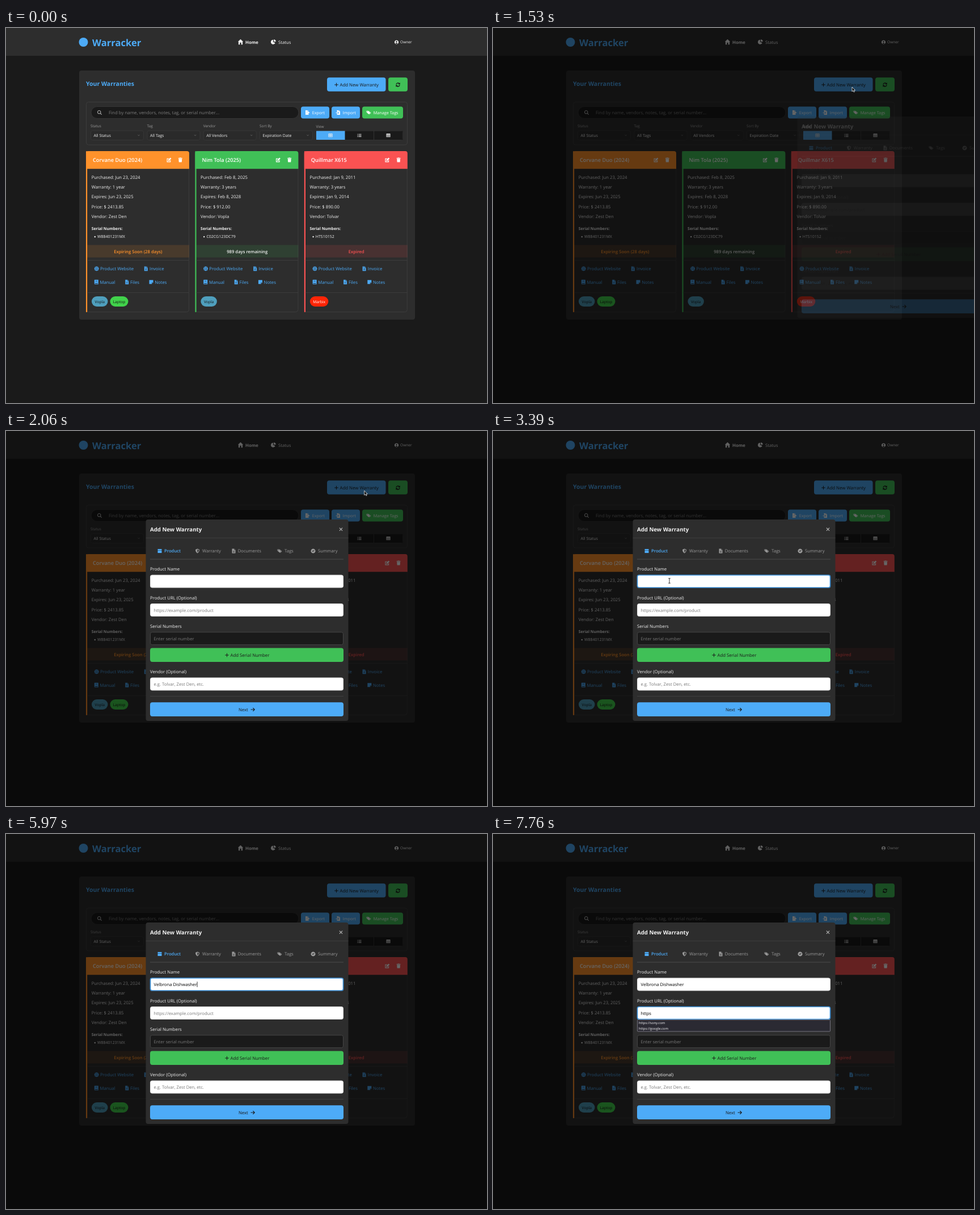
Recreate the animation shown at these times as an HTML page. Size 848 by 661 pixels, loop 8000 ms.

```html
<!DOCTYPE html>
<html lang="en">
<head>
<meta charset="utf-8">
<title>Warranty dashboard</title>
<style>
html, body { margin: 0; width: 100%; height: 100%; overflow: hidden; background: #1a1a1a; }
svg { display: block; width: 100%; height: 100%; }
text { font-family: "Open Sans", "Noto Sans", sans-serif; white-space: pre; text-rendering: geometricPrecision; }
</style>
</head>
<body>
<svg id="stage" viewBox="0 0 848 661"></svg>
<script>
const BLUE = '#4dabf7', GREEN = '#40c057', ORANGE = '#ff922b', RED = '#fa5252';
const PANEL = '#2d2d2d', DARK = '#1a1a1a', LINE = '#3c3c3c', LIGHT = '#f1f1f1', GRAY = '#999';
const LOOP = 8000, FRAME = 200 / 3;

// Icon outlines on a 16 x 16 grid, filled with the even-odd rule
const DISC = 'M8 0a8 8 0 1 0 .01 0z';
const SHEET = 'M2 0H9V5H14V16H2zM10 0L14 4H10zM5 8H11V9.3H5zM5 11H11V12.3H5z';
const ICONS = {
  home: 'M8 0L16 7.5H14V16H10V10H6V16H2V7.5H0z',
  pie: 'M7 1A7.5 7.5 0 1 0 14 11L7 8.5zM9 0V7H16A7 7 0 0 0 9 0z',
  user: DISC + 'M8 3a2.8 2.8 0 1 1-.01 0zM3.5 12.5q4.5-5 9 0q-4.5 4-9 0z',
  plus: 'M7 1H9V7H15V9H9V15H7V9H1V7H7z',
  sync: 'M1 7A7 7 0 0 1 13 3L15 1V7H9L11 5A4.5 4.5 0 0 0 3.5 7zM15 9A7 7 0 0 1 3 13L1 15V9H7L5 11A4.5 4.5 0 0 0 12.5 9z',
  search: 'M6.5 0a6.5 6.5 0 1 0 .01 0zM6.5 2a4.5 4.5 0 1 1-.01 0zM10.5 12L12 10.5L16 14.5L14.5 16z',
  export: 'M1 0H8V5H11V7H6V10H12V16H1zM9 0L12 4H9zM11 4.5L16 8.5L11 12.5V10H7V7H11z',
  import: 'M4 0H10V4H15V16H4V11H8V13L12 9L8 5V7H4zM11 0L15 3H11zM0 8H8V10H0z',
  tags: 'M0 2H6L13 9L8 14L0 7zM3 3.5a1.2 1.2 0 1 0 .01 0zM8 2L16 9L10.5 14.5L9.5 13.5L14 9L7.5 2.5z',
  grid: 'M0 1H16V15H0zM2 4H7V7.5H2zM9 4H14V7.5H9zM2 9.5H7V13H2zM9 9.5H14V13H9z',
  list: 'M0 2H3V4H0zM5 2H16V4H5zM0 7H3V9H0zM5 7H16V9H5zM0 12H3V14H0zM5 12H16V14H5z',
  table: 'M0 1H16V15H0zM2 5H5V8H2zM6.5 5H9.5V8H6.5zM11 5H14V8H11zM2 10H5V13H2zM6.5 10H9.5V13H6.5zM11 10H14V13H11z',
  chevron: 'M2 5L3 4L8 9L13 4L14 5L8 11z',
  edit: 'M1 3H8V5H3V13H11V9H13V15H1zM5 11V8L12 1L15 4L8 11z',
  trash: 'M5 0H11V1H15V3H1V1H5zM2 4H14L13 16H3z',
  globe: DISC + 'M1 5H15V6H1zM1 10H15V11H1zM5 1H6V15H5zM10 1H11V15H10z',
  file: SHEET,
  invoice: SHEET + 'M4 2H7V3.5H4z',
  book: 'M2 0H15V16H3Q1 16 1 13V2Q1 0 2 0zM3 12H13V14H3zM5 4H11V5.5H5z',
  note: 'M1 1H15V10L10 15H1zM10 10H14L10 14z',
  box: 'M1 1H15V5H1zM1 6H15V15H1z',
  shield: 'M8 0L15 3Q15 12 8 16Q1 12 1 3zM8 2.5V13.5Q13 10 13 4.5z',
  check: DISC + 'M4 8L5.5 6.5L7.2 8.2L11 4.5L12.3 6L7.2 11z',
  arrow: 'M9 2L15 8L9 14L7.5 12.5L11 9H1V7H11L7.5 3.5z',
  close: 'M2 3.5L3.5 2L8 6.5L12.5 2L14 3.5L9.5 8L14 12.5L12.5 14L8 9.5L3.5 14L2 12.5L6.5 8z'
};

// y is the middle of the capitals
const text = (s, x, y, size, color = LIGHT, weight = 400, extra = '') =>
  `<text x="${x}" y="${y + size * 0.36}" font-size="${size}" fill="${color}" font-weight="${weight}" ${extra}>${s}</text>`;
const centered = (s, x, y, size, color, weight) => text(s, x, y, size, color, weight, 'text-anchor="middle"');
const rect = (x, y, w, h, fill, r = 0, extra = '') =>
  `<rect x="${x}" y="${y}" width="${w}" height="${h}" rx="${r}" fill="${fill}" ${extra}/>`;
const framed = (x, y, w, h, fill, r, stroke = LINE, extra = '') =>
  rect(x + .5, y + .5, w - 1, h - 1, fill, r, `stroke="${stroke}" ${extra}`);
const icon = (name, x, y, size, color) =>
  `<path transform="translate(${x - size / 2} ${y - size / 2}) scale(${size / 16})" fill="${color}" fill-rule="evenodd" d="${ICONS[name]}"/>`;
const rule = (x, y, w, color = LINE) => rect(x, y, w, 1, color);

function header() {
  return rect(0, 0, 848, 49, PANEL) +
    `<circle cx="136.5" cy="25" r="8" fill="${BLUE}"/>` +
    text('Warracker', 152, 26, 16.6, BLUE, 700) +
    icon('home', 413.5, 24.5, 9.5, LIGHT) + text('Home', 422, 25, 7.7, LIGHT, 700) +
    icon('pie', 471.5, 24.5, 8.5, LIGHT) + text('Status', 480, 25, 7.7) +
    icon('user', 688.5, 25, 7.2, LIGHT) + text('Owner', 695, 25, 6.6);
}

function toolbar() {
  const button = (x, w, name, label, color) =>
    rect(x, 138.5, w, 21, color, 4) + icon(name, x + 11.5, 149, 8, '#fff') + text(label, x + 19.7, 149, 7.25, '#fff');
  const select = (x, label, value) =>
    text(label, x, 172.5, 6.5, GRAY) + framed(x, 180.5, 94, 17.5, '#2a2a2a', 3, '#363636') +
    text(value, x + 5.5, 189.3, 7.1) + icon('chevron', x + 85, 189.3, 5, '#777');
  const view = (x, name, color) => rect(x, 181.5, 50.5, 15.5, color) + icon(name, x + 25, 189.3, 7, '#eee');
  return framed(141, 130, 567, 76.5, PANEL, 4) +
    framed(149.5, 138, 367, 22, DARK, 11, '#353535') + icon('search', 165, 149, 8, '#bbb') +
    text('Find by name, vendors, notes, tag, or serial number...', 181, 149.3, 7.9, '#7c7c7c') +
    button(520, 50, 'export', 'Export', BLUE) + button(574, 50, 'import', 'Import', BLUE) +
    button(628, 72, 'tags', 'Manage Tags', GREEN) +
    select(149, 'Status', 'All Status') + select(248.5, 'Tag', 'All Tags') +
    select(347.7, 'Vendor', 'All Vendors') + select(447, 'Sort By', 'Expiration Date') +
    text('View', 546.5, 173.5, 6.5, GRAY) +
    framed(546.5, 181, 153.5, 16.5, DARK, 3) + view(547, 'grid', BLUE) + view(598, 'list', DARK) + view(649, 'table', DARK) +
    rect(648, 182, 1, 15, '#333');
}

function card(x, c) {
  const link = (name, label, dx, y, gap = 6.2) => icon(name, x + dx, y, 8, BLUE) + text(label, x + dx + gap, y + .3, 7.75, BLUE);
  let pillX = x + 10;
  const pill = ([label, width, fill, color]) => {
    const out = rect(pillX, 473, width, 18, fill, 9) + centered(label, pillX + width / 2, 482.3, 6.7, color);
    pillX += width + 4;
    return out;
  };
  const rows = ['Purchased: ' + c.bought, 'Warranty: ' + c.length, 'Expires: ' + c.ends, 'Price: $ ' + c.price, 'Vendor: ' + c.vendor];
  return framed(x, 217, 182, 284, PANEL, 4) + rect(x, 217, 2.2, 284, c.color, 1) +
    `<path d="M${x} 248.3V221q0-4 4-4h174q4 0 4 4v27.3z" fill="${c.color}"/>` +
    text(c.title, x + 12, 233, 9.25, '#fff', 600) +
    icon('edit', x + 146.5, 232.5, 9, '#fff') + icon('trash', x + 166.3, 232.5, 8, '#fff') +
    rows.map((row, i) => text(row, x + 9.7, 263.2 + i * 17.2, 7.73)).join('') +
    text('Serial Numbers:', x + 9.7, 353.3, 6.9, LIGHT, 700) +
    `<circle cx="${x + 15.8}" cy="368" r="1.2" fill="${LIGHT}"/>` + text(c.serial, x + 20, 367.7, 7) +
    rect(x + 2, 382.5, 180, 22, c.color, 0, 'opacity=".13"') +
    centered(c.state, x + 91.8, 394.2, 7.7, c.stateColor, 600) +
    rule(x + 2, 409, 180) + rule(x + 2, 466, 180) +
    link('globe', 'Product Website', 18.7, 424.3) + link('invoice', 'Invoice', 105.8, 424.3) +
    link('book', 'Manual', 18.3, 447.7) + link('file', 'Files', 72.3, 447.7, 5.8) + link('note', 'Notes', 115, 447.7) +
    c.tags.map(pill).join('');
}

const brandTag = ['Vopla', 28.5, '#4f9fbd', '#111'];
const cards = [
  { title: 'Corvane Duo (2024)', color: ORANGE, bought: 'Jun 23, 2024', length: '1 year', ends: 'Jun 23, 2025', price: '2413.85',
    vendor: 'Zest Den', serial: 'W88401231MX', state: 'Expiring Soon (28 days)', stateColor: ORANGE,
    tags: [brandTag, ['Laptop', 32, '#41d24b', '#111']] },
  { title: 'Nim Tola (2025)', color: GREEN, bought: 'Feb 8, 2025', length: '3 years', ends: 'Feb 8, 2028', price: '912.00',
    vendor: 'Vopla', serial: 'C02CG123DC79', state: '989 days remaining', stateColor: LIGHT, tags: [brandTag] },
  { title: 'Quillmar X615', color: RED, bought: 'Jan 9, 2011', length: '3 years', ends: 'Jan 9, 2014', price: '890.00',
    vendor: 'Tolvar', serial: 'HTS10152', state: 'Expired', stateColor: RED, tags: [['Marbix', 32.5, '#ff2507', '#fff']] }
];

function dashboard() {
  return rect(0, 0, 848, 661, DARK) + header() + rect(129, 75, 592, 439, PANEL, 4) +
    text('Your Warranties', 141, 98, 10.5, BLUE, 700) +
    rect(566, 87.3, 103.5, 24.5, BLUE, 4, 'id="addButton"') + icon('plus', 582.5, 100, 7.5, DARK) +
    text('Add New Warranty', 588.5, 100, 7.85, DARK) +
    rect(674, 87.3, 34, 24.5, GREEN, 4) + icon('sync', 691, 100, 8.5, DARK) +
    toolbar() + cards.map((c, i) => card(141 + i * 192.4, c)).join('');
}

function modal() {
  const tab = (name, label, x, textX, color = GRAY, weight = 400) =>
    icon(name, x, 211.5, 8, color) + text(label, textX, 211.7, 7.7, color, weight);
  const label = (s, y) => text(s, 254, y, 7.75);
  const field = (id, y, hint, fill = '#fff', stroke = '#ddd') =>
    framed(254, y, 341, 23, fill, 3, stroke, `id="${id}Box"`) + text(hint, 260.5, y + 11.8, 7.7, '#777', 400, `id="${id}Hint"`) +
    text('', 260.5, y + 11.8, 7.7, '#000', 400, `id="${id}Text"`);
  return rect(246.5, 156, 357, 355, PANEL, 4) + text('Add New Warranty', 254, 173.3, 9.7, LIGHT, 700) +
    icon('close', 590.5, 173.3, 8, '#bbb') + rule(246.5, 188, 357) +
    tab('box', 'Product', 271, 279, BLUE, 600) + tab('shield', 'Warranty', 337.5, 346) +
    tab('file', 'Documents', 401.5, 408.7) + tab('tags', 'Tags', 482.5, 491) + tab('check', 'Summary', 541.5, 550) +
    rule(254, 225.5, 341, '#4c4c4c') +
    '<g id="fields">' +
    label('Product Name', 243.7) + field('name', 253.5, '') +
    label('Product URL (Optional)', 294.2) + field('url', 304, 'https://example.com/product') +
    label('Serial Numbers', 344.2) + field('serial', 354.2, 'Enter serial number', DARK, '#444') +
    rect(254, 382.5, 341, 24.5, GREEN, 4) + icon('plus', 389.5, 395, 7.5, DARK) + text('Add Serial Number', 395.5, 395, 7.8, DARK) +
    label('Vendor (Optional)', 424.5) + field('vendor', 434.5, 'e.g. Tolvar, Zest Den, etc.') +
    '</g>' +
    rule(254, 467, 341, '#404040') +
    rect(254, 478.2, 341, 24.8, BLUE, 4) + text('Next', 410, 491, 7.75, DARK) + icon('arrow', 435.3, 491, 8.5, DARK) +
    '<g id="suggestions">' + framed(254, 327, 341, 21.5, '#2b2a33', 1, '#74737e') +
    text('https://sony.com', 257, 333, 5.9, '#fbfbfe') + text('https://google.com', 257, 343, 5.9, '#fbfbfe') + '</g>' +
    rect(0, 0, .8, 9.5, '#000', 0, 'id="caret"');
}

const stage = document.getElementById('stage');
stage.innerHTML = dashboard() +
  rect(0, 0, 848, 661, '#000', 0, 'id="shade" opacity=".6"') + `<g id="modal">${modal()}</g>` +
  '<circle id="click" cx="633" cy="104" r="6" fill="#f5e63c" opacity=".5"/>' +
  '<path id="pointer" d="M0 0V8L1.9 6.3L3.2 9L4.5 8.4L3.2 5.8H5.6z" fill="#111" stroke="#fff" stroke-width=".7"/>' +
  '<path id="beam" d="M-1.8-4.2H1.8M0-4.2V4.2M-1.8 4.2H1.8" stroke="#222" stroke-width=".9" fill="none"/>';
const $ = id => document.getElementById(id);
const set = (id, attrs) => Object.entries(attrs).forEach(([key, value]) => $(id).setAttribute(key, value));
const show = (id, on) => set(id, { visibility: on ? 'visible' : 'hidden' });

const clamp = v => Math.min(1, Math.max(0, v));
const smooth = v => v * v * (3 - 2 * v);
const bezier = (s, a, b) => 3 * (1 - s) ** 2 * s * a + 3 * (1 - s) * s * s * b + s ** 3;

// The CSS "ease" curve
function ease(x) {
  let lo = 0, hi = 1;
  for (let i = 0; i < 20; i++) {
    const mid = (lo + hi) / 2;
    if (bezier(mid, .25, .25) < x) lo = mid; else hi = mid;
  }
  return bezier(lo, .1, 1);
}

const OPEN = 1525, NAME_FOCUS = 2860, URL_FOCUS = 6240;
const NAME = 'Velbrona Dishwasher', URL_TEXT = 'https';
const NAME_KEYS = [3520, 3650, 3850, 3980, 4110, 4250, 4380, 4580, 4710, 4910, 5040, 5110, 5240, 5310, 5440, 5640, 5770, 5910, 5970];
const URL_KEYS = [6760, 6830, 6900, 7030, 7230];

function pointerAt(t) {
  if (t < 2060) {
    const p = 1 - (1 - clamp((t - 860) / 340)) ** 2;
    return [798 - 165 * p, 156 - 52 * p];
  }
  const p = smooth(clamp((t - 2040) / 820)), q = 1 - p;
  return [q * q * 633 + 2 * q * p * 420 + p * p * 311, q * q * 104 + 2 * q * p * 290 + p * p * 264];
}

function drawPointer(t, stepped) {
  const [x, y] = pointerAt(stepped);
  const visible = t >= 860 && t < NAME_KEYS[0];
  const inField = t > 2060 && x > 254 && x < 595 && y > 253 && y < 277;
  for (const id of ['pointer', 'beam']) set(id, { transform: `translate(${x} ${y})` });
  show('pointer', visible && !inField);
  show('beam', visible && inField);
  show('click', t >= 1390 && t < OPEN);
  set('addButton', { fill: t >= 1060 && t < OPEN ? '#339af0' : BLUE });
}

function drawModal(t, stepped) {
  const shown = ease(clamp((stepped - 1488) / 300));
  set('shade', { opacity: t >= OPEN ? .6 : 0 });
  set('modal', { opacity: t >= OPEN ? shown : 0, transform: `translate(${357 * (1 - shown)} 0)` });
  set('fields', { opacity: shown, transform: `translate(0 ${5 * (1 - shown)})` });
}

function drawTyping(t) {
  const typed = (s, keys) => s.slice(0, keys.filter(k => k <= t).length);
  const url = typed(URL_TEXT, URL_KEYS);
  $('nameText').textContent = typed(NAME, NAME_KEYS);
  $('urlText').textContent = url;
  const active = t >= URL_FOCUS ? 'url' : t >= NAME_FOCUS ? 'name' : '';
  for (const id of ['name', 'url']) {
    const on = id === active;
    set(id + 'Box', { stroke: on ? '#3b8fd6' : '#ddd', 'stroke-width': on ? 1.7 : 1 });
  }
  const typing = url.length > 0;
  show('urlHint', !typing);
  show('suggestions', typing);

  const last = Math.max(...[NAME_FOCUS, ...NAME_KEYS, URL_FOCUS, ...URL_KEYS].filter(k => k <= t));
  show('caret', active && (t - last) % 1060 < 530);
  if (active) set('caret', { x: 260.6 + $(active + 'Text').getComputedTextLength(), y: active === 'url' ? 311 : 260.3 });
}

function draw(now) {
  const t = now % LOOP;
  const stepped = Math.floor((t + 7) / FRAME) * FRAME;
  drawPointer(t, stepped);
  drawModal(t, stepped);
  drawTyping(t);
  requestAnimationFrame(draw);
}
const start = performance.now();
draw(0);
function draw0() {}
</script>
</body>
</html>
```
